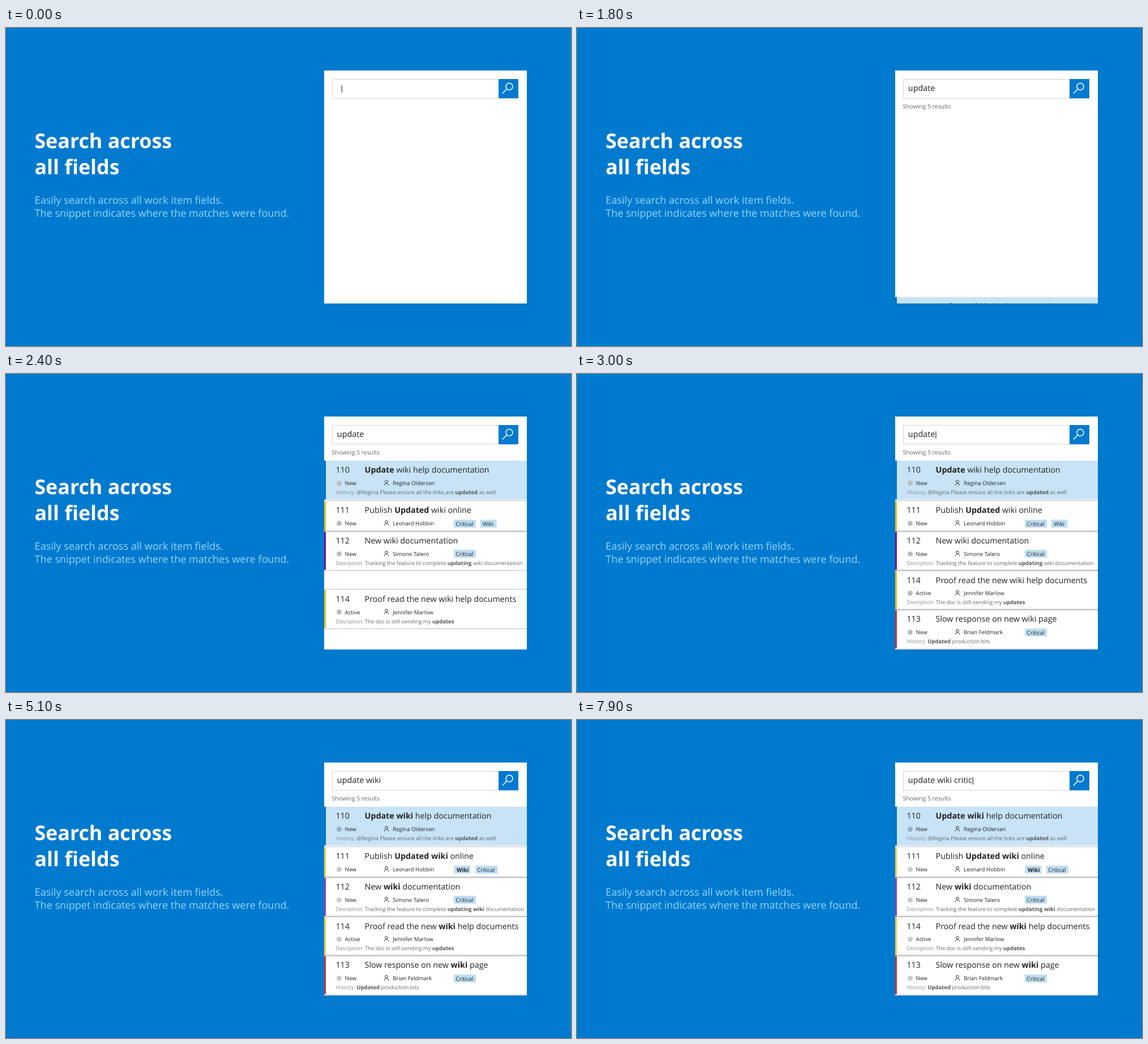
An HTML page that plays this animation: 998 by 561 pixels, repeating every 8 s.

```html
<!DOCTYPE html>
<html lang="en">
<head>
<meta charset="utf-8">
<title>Search across all fields</title>
<style>
html, body { margin: 0; width: 100%; height: 100%; overflow: hidden; background: #007ace; }
svg { display: block; width: 100vw; height: 100vh; }
text { font-family: "Open Sans", "Noto Sans", sans-serif; white-space: pre; text-rendering: geometricPrecision; fill: #222; }
.b { font-weight: 700; }
.heading { font-size: 35.8px; font-weight: 700; fill: #fff; }
.sub { font-size: 18.06px; fill: #96d5fc; }
.query { font-size: 14.4px; }
.count { font-size: 10.4px; fill: #666; }
.title { font-size: 14.28px; }
.meta { font-size: 9.7px; }
.snippet { font-size: 9.5px; fill: #666; }
.label { fill: #8a8a8a; }
.snippet .b { fill: #555; }
</style>
</head>
<body>
<svg viewBox="0 0 998 561">
  <defs><clipPath id="card"><rect x="562" y="75" width="358" height="411"/></clipPath></defs>
  <rect width="998" height="561" fill="#007ace"/>
  <text class="heading" x="50.4" y="211.5">Search across</text>
  <text class="heading" x="50.4" y="257.5">all fields</text>
  <text class="sub" x="50.6" y="310.3">Easily search across all work item fields.</text>
  <text class="sub" x="50.6" y="333">The snippet indicates where the matches were found.</text>
  <rect x="562" y="75" width="358" height="411" fill="#fff"/>
  <rect x="576.5" y="90.5" width="328" height="33.5" fill="#fff" stroke="#d4d4d4"/>
  <rect x="870" y="90" width="35" height="34" fill="#007ace"/>
  <g fill="none" stroke="#fff" stroke-width="1.5">
    <circle cx="889" cy="103.3" r="6"/>
    <path d="M884.7 107.6L876.8 115.5"/>
  </g>
  <text id="query" class="query" x="584.8" y="111"></text>
  <rect id="caret" y="101" width="1.2" height="13" fill="#333"/>
  <text id="count" class="count" x="575.5" y="141.6">Showing 5 results</text>
  <g id="list" clip-path="url(#card)"></g>
</svg>
<script>
const LOOP = 8000, STEP = 100, SWAP = 5100;
const QUERY = "update wiki critic", QUERY_X = 584.8;
const SLIDE = { distance: 342, duration: 200 };

// *always bold*, ~bold once "wiki" is searched~; y is the middle of the title line
const rows = [
  { id: 110, y: 169.3, start: 1796, bars: ["#0074c6", "#0074c6"], selected: true,
    title: "*Update* ~wiki~ help documentation", status: "New", owner: "Regina Oldersen",
    label: "History:", snippet: "@Regina Please ensure all the links are *updated* as well" },
  { id: 111, y: 240.2, start: 1926, bars: ["#e8bf0c", "#f3cd3d"], short: true,
    title: "Publish *Updated* ~wiki~ online", status: "New", owner: "Leonard Hobbin",
    tags: ["Critical", "Wiki"] },
  { id: 112, y: 294, start: 2109, bars: ["#75108f", "#8f3bb0"],
    title: "New ~wiki~ documentation", status: "New", owner: "Simone Talero",
    tags: ["Critical"], label: "Desription:",
    snippet: "Tracking the feature to complete *updating* ~wiki~ documentation" },
  { id: 114, y: 363.4, start: 2292, bars: ["#e8bf0c", "#f3cd3d"],
    title: "Proof read the new ~wiki~ help documents", status: "Active", owner: "Jennifer Marlow",
    label: "Desription:", snippet: "The doc is still oending my *updates*" },
  { id: 113, y: 432.2, start: 2475, bars: ["#d92b2b", "#d92b2b"],
    title: "Slow response on new ~wiki~ page", status: "New", owner: "Brian Feldmark",
    tags: ["Critical"], label: "History:", snippet: "*Updated* production bits" }
];

const caretKeys = [[0, 1], [1100, 1], [1400, 0], [2700, 0], [3000, 1], [3300, 0], [3400, 0],
  [3500, 1], [4400, 1], [4500, 0], [5500, 0], [5800, 1], [6100, 0], [6400, 1], [6700, 0],
  [6800, 1], [LOOP, 1]];

const $ = id => document.getElementById(id);
const clamp = v => Math.max(0, Math.min(1, v));

function rich(source, refined) {
  return source
    .replace(/\*(.+?)\*/g, '<tspan class="b">$1</tspan>')
    .replace(/~(.+?)~/g, refined ? '<tspan class="b">$1</tspan>' : "$1");
}

const text = (cls, x, y, body) => `<text class="${cls}" x="${x}" y="${y}">${body}</text>`;
const rect = (x, y, w, h, fill) => `<rect x="${x}" y="${y}" width="${w}" height="${h}" fill="${fill}"/>`;

function tag(name, x, y, bold) {
  const width = name === "Wiki" ? 29 : 39;
  return rect(x, y - 7, width, 14, "#bfdef3") +
    text(bold ? "meta b" : "meta", x + (name === "Wiki" ? 4.6 : 3.6), y + 4, name);
}

function tags(row, refined, y) {
  const names = row.tags || [];
  if (refined && names.length > 1) return tag("Wiki", 791.5, y, true) + tag("Critical", 829, y);
  return names.map((name, i) => tag(name, i ? 837.5 : 791, y)).join("");
}

function rowMarkup(row, refined) {
  const y = row.y, top = y - 16.4, bottom = y + (row.short ? 37.7 : 52.5), meta = y + 23.4;
  const line = at => rect(562, at - 1, 358, 2.2, "rgba(0,0,0,.14)");
  const dot = refined ? (row.selected ? "#94b1c8" : "#cbcbcb") : "#bdbdbd";
  const frame = row.selected
    ? rect(562, top, 358, 68.5, "#c8e3f6") + rect(562, top, 3, 68.5, row.bars[+refined])
    : line(top - .6) + line(bottom) + rect(562, top + 1, 3, bottom - top - 2, row.bars[+refined]);
  return frame +
    text("title", 582.4, y + 5.1, row.id) +
    text("title", 633.6, y + 5.1, rich(row.title, refined)) +
    `<circle cx="588.5" cy="${meta}" r="4.5" fill="${dot}"/>` +
    text("meta", 598.6, meta + 3.6, row.status) +
    `<g transform="translate(672 ${meta})" fill="none" stroke="#333">` +
    '<circle cy="-2.6" r="2.5"/><path d="M-3.8 4C-3.6 -1 3.6 -1 3.8 4"/></g>' +
    text("meta", 683.2, meta + 3.6, row.owner) +
    tags(row, refined, Math.round(meta)) +
    (row.snippet ? text("snippet", 582.6, y + 43,
      `<tspan class="label">${row.label}</tspan> ${rich(row.snippet, refined)}`) : "");
}

$("list").innerHTML = rows.map(row =>
  `<g>${[false, true].map(refined => `<g>${rowMarkup(row, refined)}</g>`).join("")}</g>`).join("");
const rowNodes = [...$("list").children];

// The caret jumps ahead first; the letter follows one step later.
function caretIndex(t) {
  const typed = (start, first, last) => Math.min(last, first + Math.floor((t - start) / 200));
  if (t >= 6800) return typed(6800, 13, 18);
  if (t >= 3700) return typed(3700, 8, 11);
  return typed(0, 1, 6);
}

function caretOpacity(t) {
  const i = caretKeys.findIndex(key => key[0] > t);
  const [t0, v0] = caretKeys[i - 1], [t1, v1] = caretKeys[i];
  return v0 + (v1 - v0) * (t - t0) / (t1 - t0);
}

function drawQuery(t) {
  const index = caretIndex(t), query = $("query");
  query.textContent = QUERY.slice(0, index);
  const end = QUERY_X + query.getComputedTextLength();
  query.textContent = QUERY.slice(0, caretIndex(t - STEP));
  $("caret").setAttribute("x", end + (index > 1 ? .9 : -1.1));
  $("caret").setAttribute("opacity", caretOpacity(t));
}

function draw(time) {
  const t = Math.floor(time % LOOP / STEP) * STEP;
  drawQuery(t);
  $("count").setAttribute("opacity", clamp((t - 1300) / 400));
  rows.forEach((row, i) => {
    const left = (1 - clamp((t - row.start) / SLIDE.duration)) ** 3;
    const node = rowNodes[i];
    node.setAttribute("transform", `translate(0 ${SLIDE.distance * left})`);
    node.setAttribute("display", t < row.start ? "none" : "inline");
    node.children[0].setAttribute("display", t < SWAP ? "inline" : "none");
    node.children[1].setAttribute("display", t < SWAP ? "none" : "inline");
  });
}

const began = performance.now();
function tick() {
  draw(performance.now() - began);
  requestAnimationFrame(tick);
}
tick();
</script>
</body>
</html>
```
